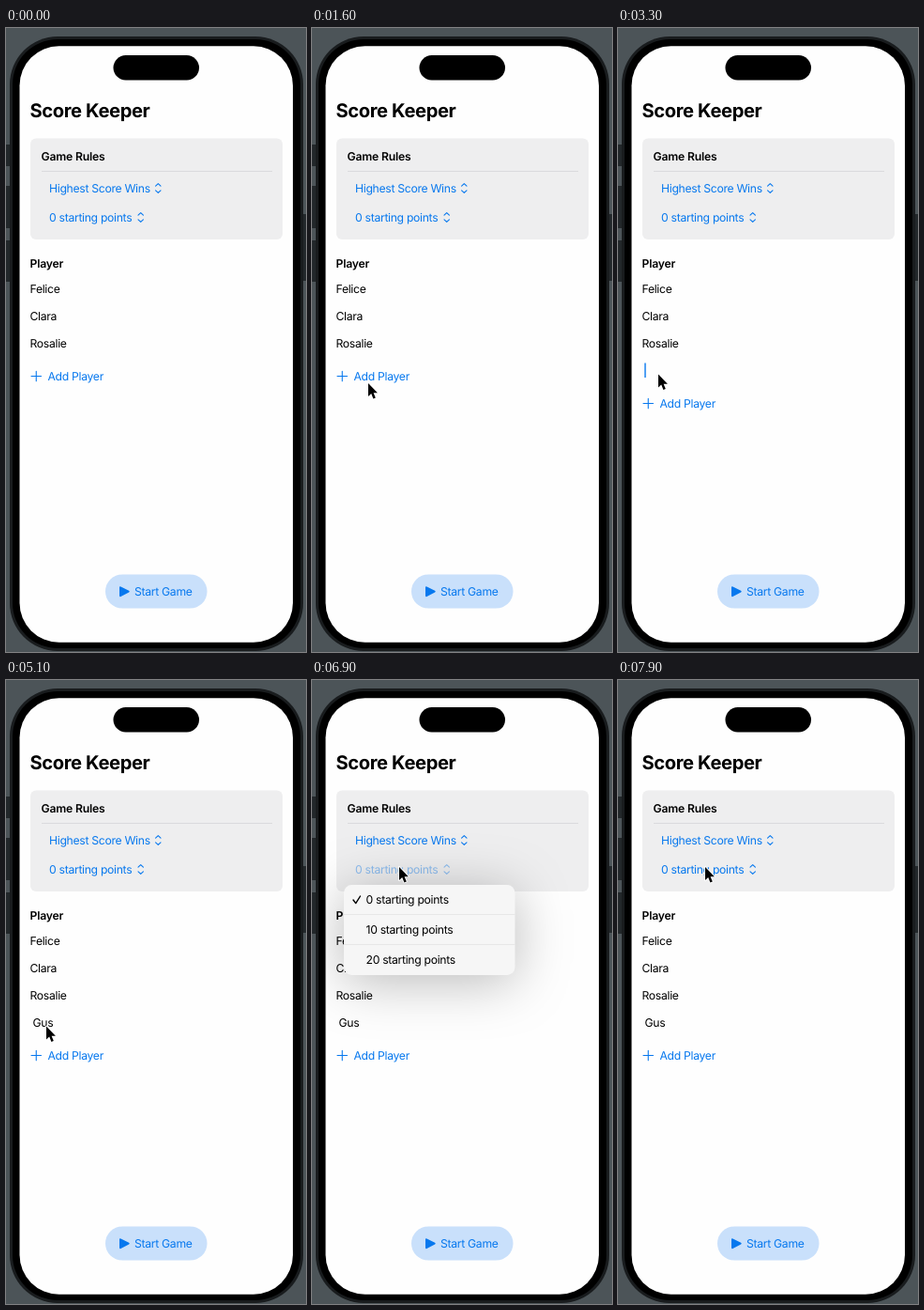
An HTML page that plays this animation: 320x664 px, repeating every 8000 ms.

```html
<!DOCTYPE html>
<html lang="en">
<head>
<meta charset="utf-8">
<title>Score Keeper</title>
<style>
  html, body { margin: 0; width: 100%; height: 100%; overflow: hidden; background: #4c5458; }
  svg { display: block; width: 320px; height: 664px; }
  text { font: 12.2px Inter, "Open Sans", sans-serif; letter-spacing: -.025em; text-rendering: geometricPrecision; white-space: pre; }
  .title { font-size: 20.2px; font-weight: 700; letter-spacing: -.02em; }
  .head { font-weight: 600; letter-spacing: -.015em; }
  .blue { fill: #0778ee; }
  .line { fill: none; stroke: #0778ee; stroke-width: 1.1; stroke-linecap: round; stroke-linejoin: round; }
  #menu { transform-origin: 96px 218px; filter: drop-shadow(0 7px 28px rgba(0, 0, 0, .27)); }
</style>
</head>
<body>
<svg viewBox="0 0 320 664">
  <defs>
    <path id="updown" class="line" d="M-2.7 -2.300 L0 -4.900 L2.700 -2.300 M-2.700 2.300 L0 4.900 L2.700 2.300"/>
    <clipPath id="glass"><rect x="14.500" y="19.300" width="291.500" height="634.500" rx="42"/></clipPath>
  </defs>

  <!-- phone -->
  <path fill="#22272a" d="M0 124h6v23h-6z M0 168h6v45h-6z M0 226h6v44h-6z M315 198h5v71h-5z"/>
  <rect x="4" y="9" width="313" height="654" rx="51" fill="#191c1e"/>
  <rect x="7" y="12" width="307" height="648" rx="48"/>
  <rect x="14.500" y="19.300" width="291.500" height="634.500" rx="42" fill="#fefefe"/>
  <rect x="114.500" y="29" width="91.500" height="26.500" rx="13.250"/>

  <text class="title" x="25.500" y="95.300">Score Keeper</text>

  <!-- rules -->
  <rect x="26" y="117.500" width="269" height="107.500" rx="6" fill="#eeeeef"/>
  <path d="M38 152.500H284" stroke="#d6d6d8" stroke-width=".8"/>
  <text class="head" x="37.500" y="141.300">Game Rules</text>
  <text class="blue" x="46" y="175">Highest Score Wins</text>
  <use href="#updown" x="162.300" y="170.500"/>
  <g id="points">
    <text class="blue" x="46" y="206">0 starting points</text>
    <use href="#updown" x="143.700" y="201.500"/>
  </g>

  <!-- players -->
  <text class="head" x="25.500" y="254.600">Player</text>
  <text x="25.500" y="281.600">Felice</text>
  <text x="25.500" y="310.600">Clara</text>
  <text x="25.500" y="339.600">Rosalie</text>
  <text id="field" x="28.500" y="368.600"></text>
  <rect id="caret" y="356.500" width="1.400" height="15.500" fill="#0778ee"/>
  <g id="add">
    <path class="line" d="M27 370.500h10.500M32.250 365.250v10.500"/>
    <text class="blue" x="44.500" y="374.800">Add Player</text>
  </g>

  <!-- start button -->
  <rect x="106" y="581.500" width="108.500" height="36" rx="18" fill="#c9e0fb"/>
  <path class="blue" d="M121 595.300q0-1.600 1.500-.9l8.600 4.400q1.500.9 0 1.800l-8.600 4.400q-1.500.7-1.500-.9z"/>
  <text class="blue" x="137" y="604.300">Start Game</text>

  <!-- pop-up menu -->
  <g clip-path="url(#glass)">
    <g id="menu">
      <rect x="34" y="218" width="182.500" height="96" rx="8.500" fill="#f6f6f6"/>
      <path d="M34 249.500h182.500M34 281.500h182.500" stroke="#e4e4e4" stroke-width=".8"/>
      <path d="M44 234l2.700 3.600l4.800-7.600" fill="none" stroke="#000" stroke-width="1.400" stroke-linecap="round" stroke-linejoin="round"/>
      <text x="57.500" y="237.800">0 starting points</text>
      <text x="57.500" y="269.800">10 starting points</text>
      <text x="57.500" y="301.800">20 starting points</text>
    </g>
  </g>

  <path id="cursor" d="M0 0V14L3.200 11.100L5.400 16.400L7.800 15.400L5.600 10.200H9.900Z"
    stroke="#fff" stroke-width="1.800" stroke-linejoin="round" paint-order="stroke"/>
</svg>

<script>
const LOOP = 8000;
const $ = id => document.getElementById(id);
const clamp = v => Math.min(1, Math.max(0, v));
const ease = v => v * v * (3 - 2 * v);
const ramp = (t, from, to) => ease(clamp((t - from) / (to - from)));

// pointer keys: time, x, y
const route = [
  [850, 190, 668], [1500, 60, 378], [2000, 60, 378], [2500, 43, 368.500],
  [5400, 43, 368.500], [6200, 93, 199]
];
const typed = [[3600, "G"], [3900, "Gu"], [4200, "Gus"]];

function pointer(t) {
  let [, x, y] = route[0];
  for (let i = 1; i < route.length; i++) {
    const k = ramp(t, route[i - 1][0], route[i][0]);
    x += (route[i][1] - route[i - 1][1]) * k;
    y += (route[i][2] - route[i - 1][2]) * k;
  }
  return [x, y];
}

function draw(t) {
  $("cursor").setAttribute("transform", `translate(${pointer(t)})`);

  $("add").setAttribute("transform", `translate(0 ${29 * ramp(t, 1750, 2000)})`);

  const name = typed.filter(key => t >= key[0]).map(key => key[1]).pop() || "";
  $("field").textContent = name;
  const typing = t >= 3600 && t < 4500;
  const blinkOn = (t - 2800) % 1000 < 600;
  $("caret").style.visibility = t >= 2800 && t < 4900 && (typing || blinkOn) ? "visible" : "hidden";
  $("caret").setAttribute("x", 28.3 + (name ? $("field").getComputedTextLength() + .3 : 0));

  // the menu grows out of its label and fades in early
  const open = ramp(t, 6500, 6850) * (1 - ramp(t, 7450, 7750));
  $("menu").style.opacity = clamp(open * 1.6);
  $("menu").style.transform = `scale(${.3 + .7 * open})`;
  $("points").style.opacity = 1 - .58 * open;
}

const start = performance.now();
function tick() {
  draw((performance.now() - start) % LOOP);
  requestAnimationFrame(tick);
}
tick();
</script>
</body>
</html>
```
